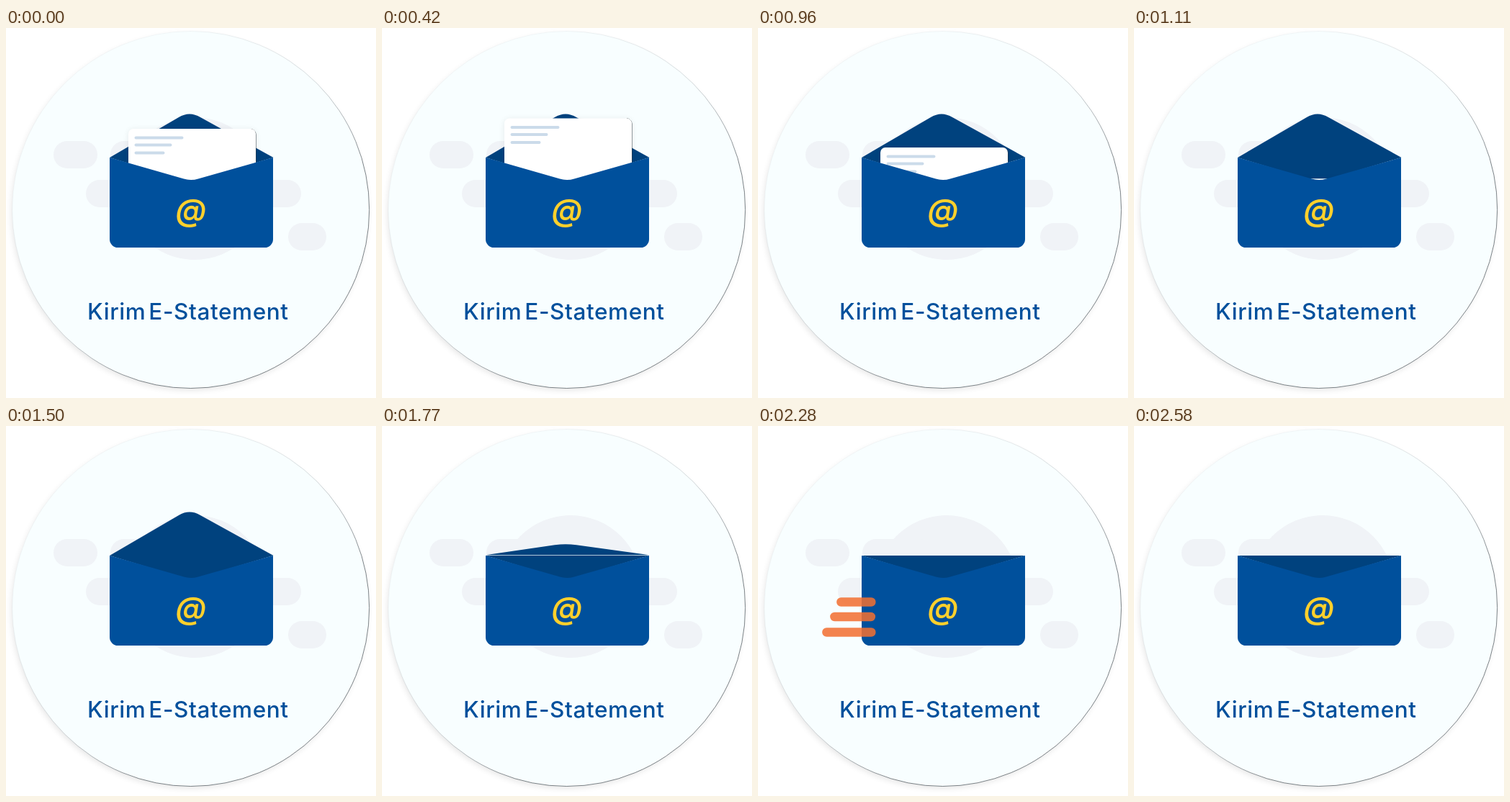
Write an HTML page that moves like this. It is 514 by 514 pixels and loops after 3.63 s.

```html
<!DOCTYPE html>
<html lang="id">
<head>
<meta charset="utf-8">
<title>Kirim E-Statement</title>
<style>
  html, body { margin: 0; height: 100%; overflow: hidden; background: #fff; }
  svg { display: block; width: 100%; height: 100%; }
  text { font-family: Inter, "Open Sans", sans-serif; }
  .at { font-size: 42.5px; font-weight: 600; font-style: italic; text-anchor: middle; }
  .title { font-size: 31.5px; font-weight: 500; letter-spacing: 0.6px; word-spacing: -5px; }
</style>
</head>
<body>
<svg viewBox="0 0 514 514">
  <defs>
    <linearGradient id="rim" x1="0.15" y1="0.15" x2="0.85" y2="0.85">
      <stop offset="0.1" stop-color="#8a949c" stop-opacity="0.1"/>
      <stop offset="0.5" stop-color="#59636b" stop-opacity="0.35"/>
      <stop offset="0.75" stop-color="#333a40" stop-opacity="0.9"/>
    </linearGradient>
    <filter id="soft" x="-10%" y="-10%" width="120%" height="120%">
      <feGaussianBlur stdDeviation="4"/>
    </filter>
    <clipPath id="aboveFold"><rect width="514" height="230"/></clipPath>
  </defs>

  <circle cx="255" cy="256" r="247" fill="#000" opacity="0.1" filter="url(#soft)"/>
  <circle cx="256.700" cy="252.500" r="248" fill="#f8feff" stroke="url(#rim)" stroke-width="0.7"/>

  <g fill="#f0f3f7">
    <circle cx="262" cy="223" r="99"/>
    <rect x="66" y="157" width="61" height="38" rx="19"/>
    <rect x="145" y="157" width="100" height="38" rx="19"/>
    <rect x="111" y="211" width="299" height="38" rx="19"/>
    <rect x="392" y="271" width="53" height="38" rx="19"/>
  </g>

  <g fill="#00427e">
    <path id="flap" d="M144 1L240-55Q255-64 270-55L371.500 1Z"/>
    <path d="M144 180H371L257 214Z"/>
  </g>

  <g clip-path="url(#aboveFold)">
    <g id="letter">
      <rect x="170" y="1" width="177" height="120" rx="7" fill="#000" opacity="0.08" filter="url(#soft)"/>
      <path d="M340 .5A7 7 0 0 1 347 7.500V110" fill="none" stroke="#333a40"/>
      <rect x="170" width="177" height="120" rx="7" fill="#fff"/>
      <path d="M180.500 12.500H244.500M180.500 22.500H228.500M180.500 33.500H218.500"
            stroke="#cbdbea" stroke-width="4" stroke-linecap="round"/>
    </g>
  </g>

  <path d="M144 180L247 209.500Q257 212.500 267 209.500L371 180V293.500A11.500 11.500 0 0 1 359.500 305H155.500A11.500 11.500 0 0 1 144 293.500Z" fill="#00509c"/>
  <text class="at" x="257" y="267.500" fill="#ffd02c">@</text>

  <path id="streaks" d="M111.500 244.500H153.500M102.500 265H153M91.500 286.500H153.500"
        stroke="#f37032" stroke-width="12.500" stroke-linecap="round"/>

  <text class="title" x="113" y="405" fill="#00509c">Kirim E-Statement</text>
</svg>

<script>
  const LOOP = 3630, STEP = 30;
  const [flap, letter, streaks] = ["flap", "letter", "streaks"].map(id => document.getElementById(id));

  const progress = (t, from, to) => Math.min(1, Math.max(0, (t - from) / (to - from)));
  const mix = (a, b, k) => a + (b - a) * k;
  const easeOut = (k, power) => 1 - (1 - k) ** power;
  const smooth = k => k * k * (3 - 2 * k);
  const cubicInOut = k => k < 0.5 ? 4 * k ** 3 : 1 - 4 * (1 - k) ** 3;

  function draw(t) {
    const lift = easeOut(progress(t, 310, 635), 2);
    const drop = cubicInOut(progress(t, 635, 1283));
    const top = mix(mix(140, 114, lift), 217, drop);
    letter.setAttribute("transform", `translate(0 ${top})`);

    const open = 1 - smooth(progress(t, 1490, 1905));
    flap.setAttribute("transform", `translate(0 179) scale(1 ${open})`);

    const slide = easeOut(progress(t, 2085, 2580), 2.35);
    streaks.setAttribute("transform", `translate(${mix(100, -39, slide)} 0)`);
    streaks.setAttribute("opacity", 0.86 * progress(t, 2070, 2160) * (1 - progress(t, 2400, 2580)));
  }

  function tick() {
    const t = performance.now() % LOOP;
    draw(Math.floor(t / STEP) * STEP);
    requestAnimationFrame(tick);
  }
  tick();
</script>
</body>
</html>
```
